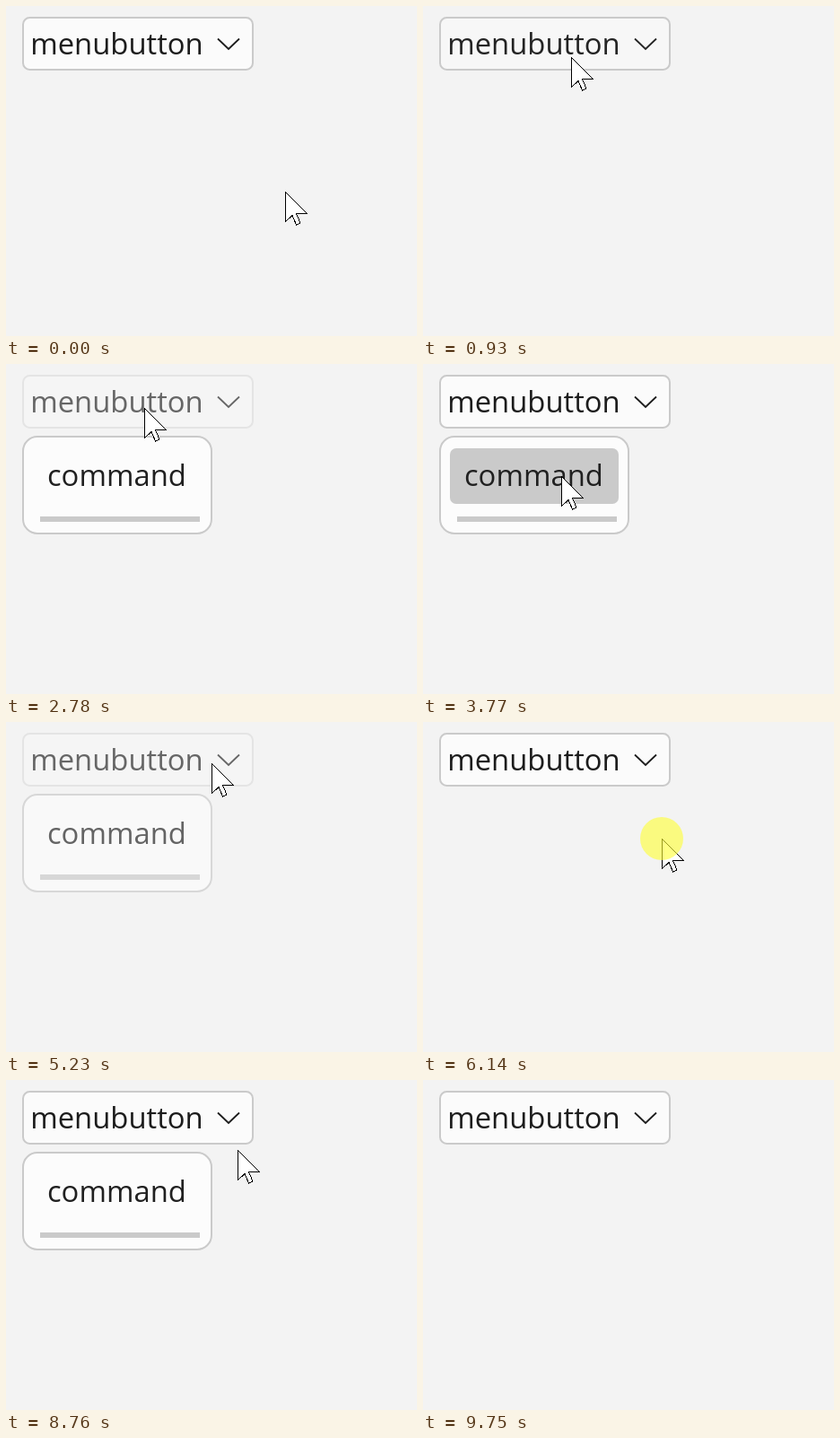
These frames come from a looping animation (458x368 px, 9850 ms). An HTML page:

```html
<!DOCTYPE html>
<html lang="en">
<head>
<meta charset="utf-8">
<title>Menubutton</title>
<style>
  html, body { margin: 0; width: 100%; height: 100%; overflow: hidden; background: #f3f3f3; }
  svg { display: block; }
  text { font: 32.8px "Open Sans", "Noto Sans", sans-serif; }
  #button { --face: #fbfbfb; --edge: #cacaca; --ink: #1c1c1c; }
  #button.hover { --face: #f7f7f7; --ink: #242424; }
  #button.pressed { --face: #f5f5f5; --edge: #e4e4e4; --ink: #666; }
  #button rect { fill: var(--face); stroke: var(--edge); stroke-width: 2px; }
  #button text { fill: var(--ink); }
  #button path { fill: none; stroke: var(--ink); stroke-width: 1.8px; }
  #cursor { fill: #fff; stroke: #000; stroke-width: 1px; shape-rendering: crispEdges; }
</style>
</head>
<body>
<svg width="458" height="368" viewBox="0 0 458 368">
  <g id="button">
    <rect x="19" y="13" width="256" height="58" rx="7.5"/>
    <text x="27.2" y="54">menubutton</text>
    <path d="M236 36.5 L248 48 L260 36.5"/>
  </g>
  <g id="menu">
    <rect x="19" y="81" width="210" height="108" rx="16" fill="#fcfcfc" stroke="#cacaca" stroke-width="2"/>
    <rect id="highlight" x="30" y="94" width="188" height="62" rx="7" fill="#cacaca"/>
    <text x="46" y="136" fill="#202020">command</text>
    <rect x="38" y="170" width="178" height="6" fill="#cacaca"/>
  </g>
  <g id="pointer">
    <path id="cursor" d="M.5 .5 V33.5 L8 26.5 L12.5 37 L17 35 L12.5 24.5 H24.5 Z"/>
    <circle id="flash" r="24" fill="#ff3" fill-opacity=".6"/>
  </g>
</svg>
<script>
const LOOP = 9850, FRAME = 33.3, FLASH = 95;
const FADE_DELAY = 40, FADE = 150;
const $ = id => document.getElementById(id);

const START = { x: 311, y: 207 };
const move = (from, to, x, y) => ({ from, to, x, y });
const MOVES = [
  move(90, 160, 307, 209),
  move(360, 1020, 158, 49),
  move(1350, 1650, 152, 119),
  move(1880, 2210, 154, 49),
  move(3450, 3770, 154, 126),
  move(4400, 4570, 160, 173),
  move(4600, 4890, 229, 46),
  move(5460, 5870, 266, 130),
  move(6640, 6780, 233, 64),
  move(7910, 7980, 240, 49),
  move(8760, 9280, 442, 372)
];

// Each use of the menu: button pressed, button back to normal, menu closed
const use = (press, release, close) => ({ press, release, close });
const USES = [
  use(2580, 3080, 4000),
  use(5090, 5460, 6140),
  use(6980, 7480, 8250),
  use(8250, 8760, 9750)
];

const clamp = v => Math.max(0, Math.min(1, v));
const easeOut = p => 1 - (1 - p) ** 1.5;
const within = (p, x, y, w, h) => p.x >= x && p.x < x + w && p.y >= y && p.y < y + h;

// The pointer advances once per recorded frame
function pointerAt(t) {
  let { x, y } = START;
  for (const m of MOVES) {
    if (t < m.from) break;
    const steps = Math.floor((t - m.from + 5) / FRAME) + 1;
    const e = easeOut(clamp(steps * FRAME / (m.to - m.from + FRAME)));
    x += (m.x - x) * e;
    y += (m.y - y) * e;
  }
  return { x: Math.round(x), y: Math.round(y) };
}

function draw(t) {
  const p = pointerAt(t);
  const current = USES.find(u => t >= u.press && t < u.close);
  const clicked = at => at < MOVES.at(-1).to && t >= at && t < at + FLASH;
  const pressed = current && t < current.release;

  $("pointer").setAttribute("transform", `translate(${p.x} ${p.y})`);
  $("flash").style.opacity = USES.some(u => clicked(u.press) || clicked(u.close)) ? 1 : 0;
  $("button").setAttribute("class", pressed ? "pressed" : within(p, 18, 12, 258, 60) ? "hover" : "");
  $("menu").style.opacity = current ? clamp((t - current.press - FADE_DELAY) / FADE) : 0;
  $("highlight").style.opacity = within(p, 30, 94, 188, 62) ? 1 : 0;
}

const begin = performance.now();
function tick() {
  draw((performance.now() - begin) % LOOP);
  requestAnimationFrame(tick);
}
tick();
</script>
</body>
</html>
```
